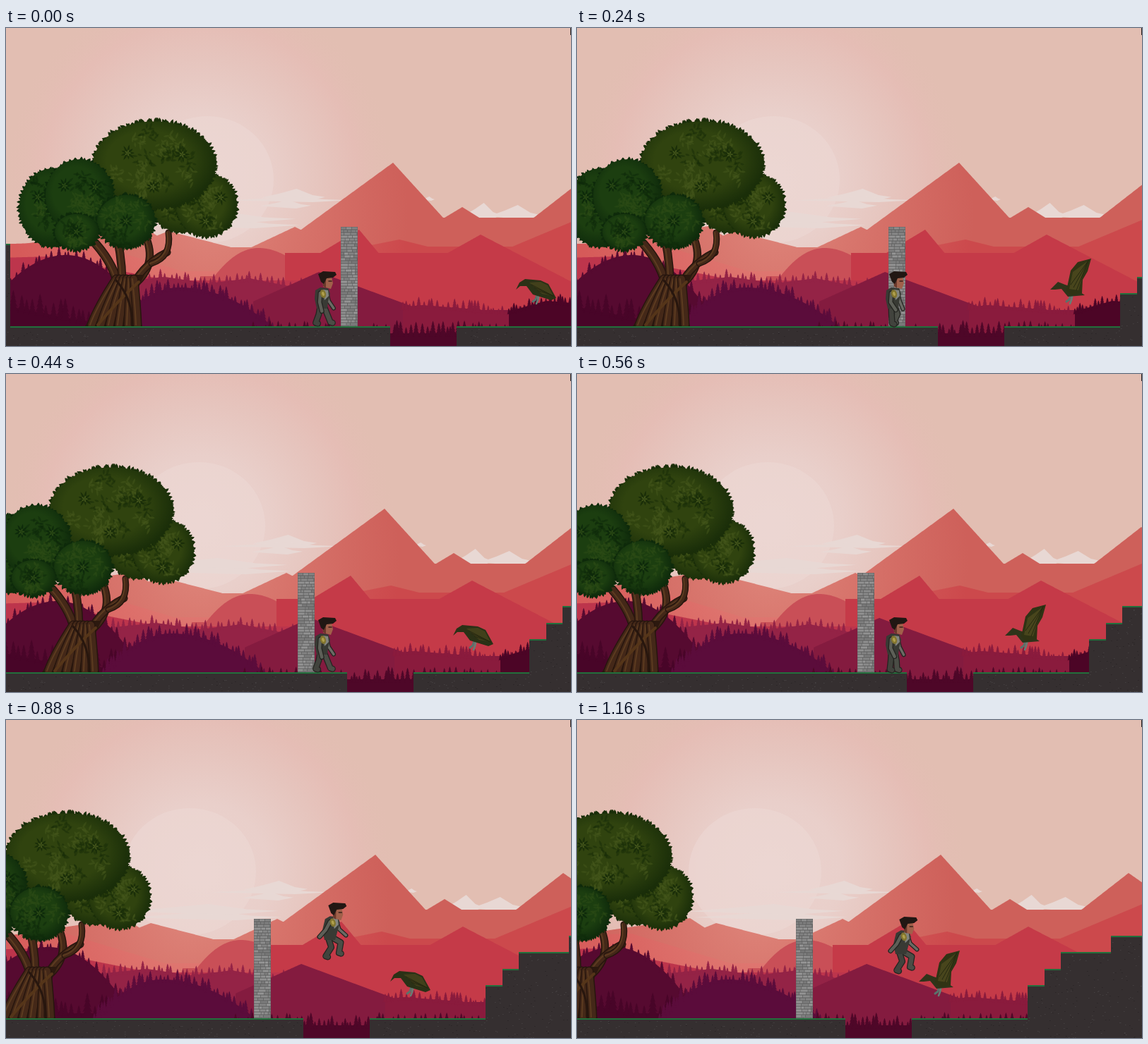
These frames come from a looping animation (800x451 px, 1200 ms). An HTML page with a canvas:

```html
<!DOCTYPE html>
<html lang="en">
<head>
<meta charset="utf-8">
<title>Side-scroller at sunset</title>
<style>
html, body { margin: 0; width: 100%; height: 100%; overflow: hidden; background: #e2beb2; }
canvas { display: block; width: 100%; height: 100%; }
</style>
</head>
<body>
<canvas id="stage" width="800" height="451"></canvas>
<script>
const W = 800, H = 451, LOOP = 1200, STEP = 40;
const TILE = 23.5, FLOOR = 423, TURN = Math.PI * 2;
const ctx = document.getElementById('stage').getContext('2d');

// Seeded random numbers keep the textures stable.
let seed = 7;
function rnd(a = 0, b = 1) {
  seed = (seed * 1664525 + 1013904223) % 4294967296;
  return a + (b - a) * seed / 4294967296;
}
function layer(w, x0, paint) {
  const c = document.createElement('canvas');
  c.width = w;
  c.height = H;
  const g = c.getContext('2d');
  g.translate(-x0, 0);
  paint(g);
  return c;
}
function trace(g, p) {
  g.beginPath();
  for (let i = 0; i < p.length; i += 2) g.lineTo(p[i], p[i + 1]);
}
function poly(g, p, fill) {
  trace(g, p);
  g.closePath();
  g.fillStyle = fill;
  g.fill();
}
function line(g, p, width, color) {
  trace(g, p);
  g.lineWidth = width;
  g.lineCap = g.lineJoin = 'round';
  g.strokeStyle = color;
  g.stroke();
}
function oval(g, x, y, rx, ry, fill, turn = 0) {
  g.beginPath();
  g.ellipse(x, y, rx, ry, turn, 0, TURN);
  g.fillStyle = fill;
  g.fill();
}
function glow(g, x, y, r, stops) {
  const f = g.createRadialGradient(x, y, 0, x, y, r);
  stops.forEach(([at, color]) => f.addColorStop(at, color));
  return f;
}

// A skyline is the highest of its peaks: [x, top, left slope, right slope, power].
function skyline(base, peaks) {
  return x => Math.min(base(x), ...peaks.map(([px, top, left, right, power = 1]) =>
    top + (x < px ? left : right) * Math.abs(x - px) ** power));
}
function ridge(g, x0, x1, fill, height) {
  const p = [x0, H];
  for (let x = x0; x <= x1; x++) p.push(x, height(x));
  poly(g, [...p, x1, H], fill);
}
function pine(g, x, y, h, fill) {
  const right = [x, y - h], left = [];
  for (let i = 1; i <= 5; i++) {
    const w = h * 0.045 * i + 0.6, ty = y - h + h * i / 5;
    right.push(x + w, ty, x + w * 0.55, ty - 1);
    left.unshift(x - w * 0.55, ty - 1, x - w, ty);
  }
  poly(g, right.concat(left), fill);
}
function forest(g, x0, x1, fill, height, gap, lo, hi) {
  ridge(g, x0, x1, fill, height);
  for (let x = x0; x < x1; x += rnd(gap * 0.5, gap * 1.5)) {
    pine(g, x, height(x) + 5, rnd(lo, hi) + 5, fill);
  }
}
const flat = y => () => y;

const sky = layer(W, 0, g => {
  g.fillStyle = '#e2beb2';
  g.fillRect(0, 0, W, H);
  g.fillStyle = glow(g, 275, 215, 280, [
    [0, '#ead3cf'], [0.35, '#e9cfca'], [0.6, '#e6c5be'], [0.8, '#e5bdb5'], [1, 'rgba(226,190,178,0)']
  ]);
  g.fillRect(0, 0, W, H);
});

function cloud(g, x0, x1, y, h) {
  const w = x1 - x0;
  g.beginPath();
  g.moveTo(x0, y + h * 0.7);
  g.lineTo(x0 + w * 0.3, y + h * 0.35);
  g.lineTo(x0 + w * 0.55, y);
  g.lineTo(x0 + w * 0.8, y + h * 0.5);
  g.lineTo(x1, y + h * 0.65);
  g.lineTo(x0 + w * 0.7, y + h);
  g.fillStyle = '#e8d8d4';
  g.fill();
}

const hills = layer(860, 0, g => {
  ridge(g, 0, 860, '#ce605a', skyline(x => x < 500 ? 311 : 269, [
    [193, 281, 0.15, 0.65], [230, 288, 0.4, 0.26], [409, 282, 0.47, 0.5],
    [548, 191, 0.73, 1.1], [646, 254, 0.6, 0.62], [814, 217, 0.78, 0.7]
  ]));
  ridge(g, 490, 860, '#cc494c', skyline(flat(310), [[557, 300, 0.2, 0.25], [860, 250, 0.42, 0]]));
  ridge(g, 0, 420, '#d65a59', skyline(flat(345), [[110, 303, 0.03, 0.3]]));
  g.globalCompositeOperation = 'source-atop';
  g.fillStyle = glow(g, 290, 265, 280, [
    [0, 'rgba(238,172,156,.5)'], [0.5, 'rgba(238,165,150,.25)'], [1, 'rgba(235,160,145,0)']
  ]);
  g.fillRect(0, 0, 860, H);

  g.globalCompositeOperation = 'destination-over';
  [[315, 485, 239, 8], [362, 452, 228, 18], [360, 432, 244, 12], [190, 410, 261, 15], [200, 416, 271, 13],
    [590, 607, 239, 6], [648, 700, 248, 26], [685, 757, 251, 22]].forEach(c => cloud(g, ...c));
  oval(g, 285, 215, 94, 90, 'rgba(236,216,213,.55)');
  g.globalCompositeOperation = 'source-over';

  ridge(g, 275, 440, '#c94f57', skyline(flat(352), [[357, 312, 0.0105, 0.0072, 2]]));
  ridge(g, 395, 860, '#c53a48', skyline(x => x < 672 ? 319 : 400, [[500, 286, 0.6, 1.2], [672, 293, 0.56, 0.52]]));
  ridge(g, 0, 450, '#bd354c', skyline(flat(358), [[60, 324, 0.03, 0.2]]));

  forest(g, 120, 470, '#942346', skyline(flat(367), [[225, 353, 0.1, 0.15], [345, 355, 0.12, 0.2]]), 7, 4, 14);
  ridge(g, 350, 860, '#841b3f', skyline(flat(400), [[443, 346, 0.45, 0.37]]));
  forest(g, 562, 860, '#8a1b3d', skyline(flat(404), [[590, 393, 0.1, 0.08]]), 6, 3, 14);
  forest(g, 0, 205, '#560a30', skyline(flat(440), [[85, 322, 0.006, 0.0068, 2]]), 8, 4, 13);
  forest(g, 0, 190, '#480528', skyline(flat(416), [[10, 396, 0, 0.2]]), 9, 10, 30);
  forest(g, 150, 385, '#5b0c3b', skyline(flat(440), [[246, 368, 0.0062, 0.0032, 2]]), 6, 4, 18);
  forest(g, 350, 712, '#4e0728', flat(433), 6, 4, 19);
  forest(g, 712, 860, '#4c0526', skyline(flat(410), [[765, 387, 0.28, 0.08]]), 5, 3, 13);
});

function leaf(g, x, y, a, len, wide, fill) {
  const c = Math.cos(a), s = Math.sin(a), mx = x + c * len / 2, my = y + s * len / 2;
  g.beginPath();
  g.moveTo(x, y);
  g.quadraticCurveTo(mx - s * wide, my + c * wide, x + c * len, y + s * len);
  g.quadraticCurveTo(mx + s * wide, my - c * wide, x, y);
  g.fillStyle = fill;
  g.fill();
}
function rosette(g, x, y, dark, light) {
  for (let i = 0; i < 9; i++) leaf(g, x, y, i * 0.7, rnd(9, 12), 2.6, dark);
  for (let i = 0; i < 5; i++) leaf(g, x, y, i * 1.25, 5, 2, light);
}
function bush(g, x, y, rx, ry, [light, mid, dark], tufts) {
  const spot = (a, d) => [x + Math.cos(a) * rx * d, y + Math.sin(a) * ry * d];
  for (let a = 0; a < TURN; a += 3 / rx) {
    leaf(g, ...spot(a, 1 - 7 / rx), a + rnd(-0.6, 0.6), rnd(6, 10), 4, dark);
  }
  g.save();
  g.translate(x, y);
  g.scale(1, ry / rx);
  oval(g, 0, 0, rx - 2, rx - 2, glow(g, -rx * 0.1, -rx * 0.1, rx * 1.1, [[0, mid], [0.6, mid], [1, dark]]));
  g.restore();
  for (let i = 0; i < rx / 5; i++) {
    const [cx, cy] = spot(rnd(0, TURN), rnd(0.15, 0.7)), shade = i % 3 ? light : dark;
    g.globalAlpha = 0.55;
    for (let k = 0; k < 16; k++) {
      leaf(g, cx + rnd(-10, 10), cy + rnd(-9, 9), rnd(0, TURN), rnd(6, 11), 3, shade);
    }
  }
  g.globalAlpha = 1;
  for (let i = 0; i < tufts; i++) rosette(g, ...spot(i * 2.1 + 3.7, tufts > 1 ? 0.5 : 0), dark, light);
}
function bend(g, x0, y0, cx, cy, x1, y1, width, color) {
  g.beginPath();
  g.moveTo(x0, y0);
  g.quadraticCurveTo(cx, cy, x1, y1);
  g.lineWidth = width;
  g.lineCap = 'round';
  g.strokeStyle = color;
  g.stroke();
}
function branch(g, x0, y0, cx, cy, x1, y1, width) {
  bend(g, x0, y0, cx, cy, x1, y1, width, '#27160e');
  bend(g, x0, y0, cx, cy, x1, y1, width - 3, '#442818');
  bend(g, x0 - 2, y0, cx - 2, cy, x1 - 2, y1, 2, '#5c3b20');
}
function tree(g) {
  branch(g, 160, 372, 155, 338, 127, 306, 13);
  branch(g, 164, 372, 166, 340, 158, 300, 12);
  branch(g, 176, 368, 218, 338, 196, 292, 11);
  branch(g, 174, 378, 188, 338, 228, 318, 11);
  branch(g, 206, 334, 235, 325, 230, 290, 9);
  poly(g, [112, 423, 146, 370, 156, 350, 196, 350, 182, 380, 193, 423], '#2c190f');
  for (let i = 0; i < 6; i++) {
    const foot = 121 + i * 13, crown = 156 + i * 5;
    branch(g, foot, 421, 130 + i * 11, 396, crown, 356, 13);
  }
  bend(g, 188, 360, 160, 385, 130, 421, 4, '#553519');
  bend(g, 156, 358, 180, 385, 178, 421, 3, '#27160e');

  const warm = ['#44561c', '#30430f', '#1a2e09'], cool = ['#2c4a16', '#1c3e10', '#0e2a0b'];
  bush(g, 250, 240, 52, 52, warm, 0);
  bush(g, 284, 251, 45, 47, warm, 3);
  bush(g, 210, 194, 89, 63, warm, 3);
  bush(g, 66, 255, 49, 58, cool, 2);
  bush(g, 104, 238, 50, 54, cool, 2);
  bush(g, 170, 274, 43, 39, cool, 1);
  bush(g, 100, 289, 33, 27, cool, 1);
}
function tower(g) {
  g.fillStyle = '#5e5e5e';
  g.fillRect(474, 282, 24, FLOOR - 282);
  for (let y = 282; y < FLOOR; y += 4) {
    for (let x = 474; x < 498;) {
      const w = Math.min(rnd(4, 11), 498 - x), tone = Math.round(rnd(120, 152));
      g.fillStyle = `rgb(${tone},${tone},${tone})`;
      g.fillRect(x + 0.3, y + 0.5, Math.max(0, w - 0.7), 3);
      x += w;
    }
  }
}
function ground(g, x0, x1, y) {
  const w = x1 - x0;
  g.fillStyle = '#352f30';
  g.fillRect(x0, y, w, H - y);
  for (let i = 0; i < w * (H - y) / 90; i++) {
    g.fillStyle = rnd() < 0.6 ? '#454041' : '#2a2526';
    g.fillRect(Math.floor(rnd(x0, x1 - 2)), Math.floor(rnd(y + 4, H)), 1.5, 1);
  }
  g.fillStyle = '#22703c';
  g.fillRect(x0, y, w, 2);
}
const END = 1020;
const world = layer(END + 40, -40, g => {
  tree(g);
  tower(g);
  ground(g, 6, 544, FLOOR);
  ground(g, -40, 6, 306);
  ground(g, 544 + 4 * TILE, END, FLOOR);
  [0, 1, 2, 5].forEach((n, i) => ground(g, Math.round(802 + n * TILE), END, Math.round(376 - i * 23.4)));
});

// Two joined bones; angles in degrees, 0 hangs down and positive swings forward.
function limb(g, x, y, a, b, len, width, color, foot = 0) {
  const p = [x, y];
  for (const deg of [a, b]) {
    const r = deg * TURN / 360;
    p.push(x += Math.sin(r) * len, y += Math.cos(r) * len);
  }
  if (foot) p.push(x + foot, y + 1);
  line(g, p, width, '#232420');
  line(g, p, width - 2.5, color);
}
function head(g, x, y) {
  poly(g, [x - 7, y + 9, x + 6, y + 8, x + 8, y + 17, x + 5, y + 25, x - 6, y + 22], '#a0604a');
  poly(g, [x - 7, y + 11, x - 2, y + 11, x - 2, y + 24, x - 6, y + 21], '#6a392c');
  line(g, [x + 2, y + 14, x + 6, y + 14], 1.5, '#38201b');
  poly(g, [x - 13, y + 4, x - 6, y, x + 11, y + 1, x + 13, y + 5, x + 8, y + 9, x - 1, y + 10,
    x - 5, y + 18, x - 9, y + 15], '#211713');
}
function hero(g, y, pose) {
  const { lean, leg, front, back, arm, far } = pose;
  const hip = 448 + lean, chest = 449 + lean * 1.25, top = y + 23 - lean / 3, seat = y + 49;
  limb(g, chest + 5, top + 6, ...far, 13, 6, '#6a6b64');
  limb(g, hip + 2, seat, ...front, leg, 9, '#4b4d46', 3);
  limb(g, hip - 3, seat, ...back, leg, 9, '#41433d', 3);
  poly(g, [chest - 11, top + 4, chest - 4, top, chest + 7, top + 1, chest + 10, top + 9, chest + 7, top + 20,
    hip + 7, seat + 4, hip - 8, seat + 4, hip - 11, seat - 10], '#383a34');
  poly(g, [chest, top + 3, chest + 7, top + 4, chest + 8, top + 12, chest + 2, top + 18], '#83857f');
  limb(g, chest - 4, top + 8, ...arm, 13, 7, '#5d5f57');
  oval(g, chest, top + 9, 4, 6, '#82752e', -0.3);
  oval(g, chest, top + 9, 1.8, 3, '#b0a04c', -0.3);
  head(g, 455 + lean * 1.3, y);
}
function walk(t) {
  const s = Math.cos(t / 440 * TURN);
  const bent = Math.max(0, -s) * 20;
  return { lean: 0, leg: 12.5, front: [10 + 12 * s + bent, 8 + 14 * s - bent], back: [-4 - 6 * s, -8 - 12 * s],
    arm: [-4, 24 - 10 * s], far: [12, 28 + 6 * s] };
}
const leap = { lean: 11, leg: 15, front: [60, -10], back: [18, -32], arm: [-28, -42], far: [18, 48] };

function beast(g, t) {
  const x = 750 - 235 * t / 1160, phase = t % 440;
  const up = phase >= 100 && phase <= 340;
  g.save();
  g.translate(Math.round(up ? x - 4 : x), 388);
  line(g, [3, -13, 0, -3, -4, 0], 3, '#58736c');
  line(g, [5, -11, 3, -2, 1, 3], 2.5, '#667e75');
  if (up) {
    poly(g, [-27, -17, -16, -28, -6, -24, 6, -20, 22, -9, -2, -7, -11, -18, -20, -17], '#2f341a');
    poly(g, [-4, -16, 2, -44, 12, -56, 31, -61, 26, -43, 19, -31, 18, -12, 3, -9], '#303314');
    poly(g, [0, -18, 5, -42, 27, -58, 19, -38, 13, -16], '#48451c');
  } else {
    poly(g, [-28, -17, -23, -27, -15, -32, 7, -30, 18, -25, 29, -5, 22, -2, -4, -10, -13, -22, -22, -22], '#2b3116');
    poly(g, [-9, -27, 7, -28, 17, -23, 25, -8, 9, -11], '#42401b');
  }
  const tip = up ? [27, -58] : [25, -8], root = up ? 2 : -6;
  for (let i = 0; i < 3; i++) line(g, [root + i * 4, -24 + i * 4, ...tip], 1, '#262810');
  g.restore();
}

// Key points [time, distance] of the scroll.
const keys = [[0, 0], [120, 17], [320, 43.5], [440, 61], [720, 99], [880, 123], [1160, 164]];
function scroll(t) {
  const i = Math.max(1, keys.findIndex(k => k[0] >= t));
  const [t0, a] = keys[i - 1], [t1, b] = keys[i];
  return a + (b - a) * (t - t0) / (t1 - t0);
}
const jump = t => 93 - 7.3e-4 * (t - 971) ** 2;

function draw(t) {
  const s = scroll(t);
  ctx.drawImage(sky, 0, 0);
  ctx.drawImage(hills, -Math.round(s * 0.2), 0);
  ctx.drawImage(world, -40 - Math.round(s), 0);
  beast(ctx, t);
  if (t < 640) hero(ctx, 345, walk(t));
  else hero(ctx, Math.round(346 - jump(t)), leap);
  ctx.fillStyle = '#201b1b';
  ctx.fillRect(799, 0, 1, 10);
}
const start = performance.now();
function tick() {
  const t = (performance.now() - start) % LOOP;
  draw(Math.floor(t / STEP) * STEP);
  requestAnimationFrame(tick);
}
tick();
</script>
</body>
</html>
```
